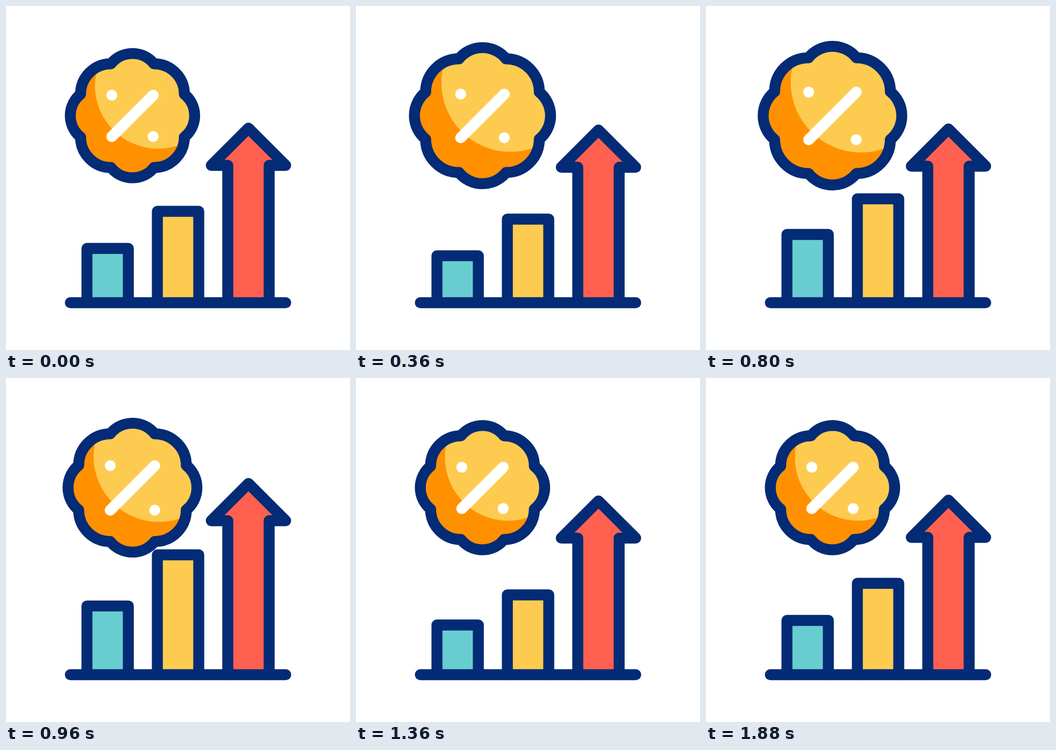
Recreate the animation shown at these times as an HTML page. Size 640x640 px, loop 2 s.

```html
<!DOCTYPE html>
<html lang="en">
<head>
<meta charset="utf-8">
<title>Growing discount chart</title>
<style>
  html, body { margin: 0; width: 100%; height: 100%; overflow: hidden; background: #fff; }
  svg { display: block; width: 100%; height: 100%; }
  .line { fill: none; stroke: #042b75; stroke-width: 20.4; stroke-linecap: round; stroke-linejoin: round; }
  #percent { stroke: #fff; }
  #teal { fill: #68cdd1; }
  #yellow { fill: #fdcb50; }
  #arrow { fill: #ff6050; }
</style>
</head>
<body>
<svg viewBox="0 0 640 640">
  <clipPath id="inside"><path class="rim"/></clipPath>
  <path class="rim" fill="#ff9100"/>
  <g clip-path="url(#inside)"><circle id="shine" fill="#fdcb50"/></g>
  <path class="rim line"/>
  <path id="percent" class="line"/>
  <path id="teal" class="line"/>
  <path id="yellow" class="line"/>
  <path id="arrow" class="line"/>
  <path class="line" d="M119.7 552H520.4"/>
</svg>
<script>
const LOOP = 2000, STEP = 40;
const CX = 235.3, CY = 204, BASE = 552;

// Tables of [time, value]; values ease from one to the next.
const badgeScale = [[80, 1], [600, 1.17], [1120, 1]];
const percentScale = [[160, 1], [680, 1.17], [1200, 1]];
const tealTop = [[150, 451], [480, 470.2], [880, 420.2], [1280, 460.9], [1600, 451]];
const yellowTop = [[190, 382], [560, 415.2], [960, 329], [1360, 403.5], [1655, 382]];
const arrowTop = [[300, 296.5], [570, 326], [1120, 250.8], [1480, 313.5], [1880, 296.5]];

const $ = id => document.getElementById(id);
const rims = document.querySelectorAll('.rim');

function valueAt(keys, t) {
  if (t <= keys[0][0]) return keys[0][1];
  for (let i = 1; i < keys.length; i++) {
    const [t0, a] = keys[i - 1], [t1, b] = keys[i];
    if (t < t1) return a + (b - a) * (1 - Math.cos(Math.PI * (t - t0) / (t1 - t0))) / 2;
  }
  return keys[keys.length - 1][1];
}

// Eight lobes; those on the axes bulge a little more than the diagonal ones.
function rimPath(scale) {
  let d = '';
  for (let i = 0; i <= 8; i++) {
    const angle = (i - 2.5) * Math.PI / 4;
    const x = CX + 104.5 * scale * Math.cos(angle);
    const y = CY + 104.5 * scale * Math.sin(angle);
    const r = (i % 2 ? 51.4 : 56.5) * scale;
    d += i ? `A${r} ${r} 0 0 1 ${x} ${y}` : `M${x} ${y}`;
  }
  return d + 'Z';
}

function percentPath(scale) {
  const r = 38.5 * scale;
  const l = CX - r, right = CX + r, top = CY + .5 - r, low = CY + .5 + r;
  return `M${l} ${top}h.01M${right} ${low}h.01M${l} ${low}L${right} ${top}`;
}

const barPath = (x, top) => `M${x} ${BASE}V${top}h77V${BASE}`;
const arrowPath = y => `M412.6 ${BASE}V${y}h-30.7l69.2 -69.2l69.2 69.2h-30.7V${BASE}`;

function draw(t) {
  const s = valueAt(badgeScale, t);
  const rim = rimPath(s);
  rims.forEach(path => path.setAttribute('d', rim));
  const shine = $('shine');
  shine.setAttribute('cx', CX + 47.7 * s);
  shine.setAttribute('cy', CY - 56 * s);
  shine.setAttribute('r', 117.5 * s);
  $('percent').setAttribute('d', percentPath(valueAt(percentScale, t)));
  $('teal').setAttribute('d', barPath(150.6, valueAt(tealTop, t)));
  $('yellow').setAttribute('d', barPath(281.6, valueAt(yellowTop, t)));
  $('arrow').setAttribute('d', arrowPath(valueAt(arrowTop, t)));
}

const start = performance.now();
function tick() {
  const t = (performance.now() - start) % LOOP;
  draw(Math.floor(t / STEP) * STEP);
  requestAnimationFrame(tick);
}
tick();
</script>
</body>
</html>
```
